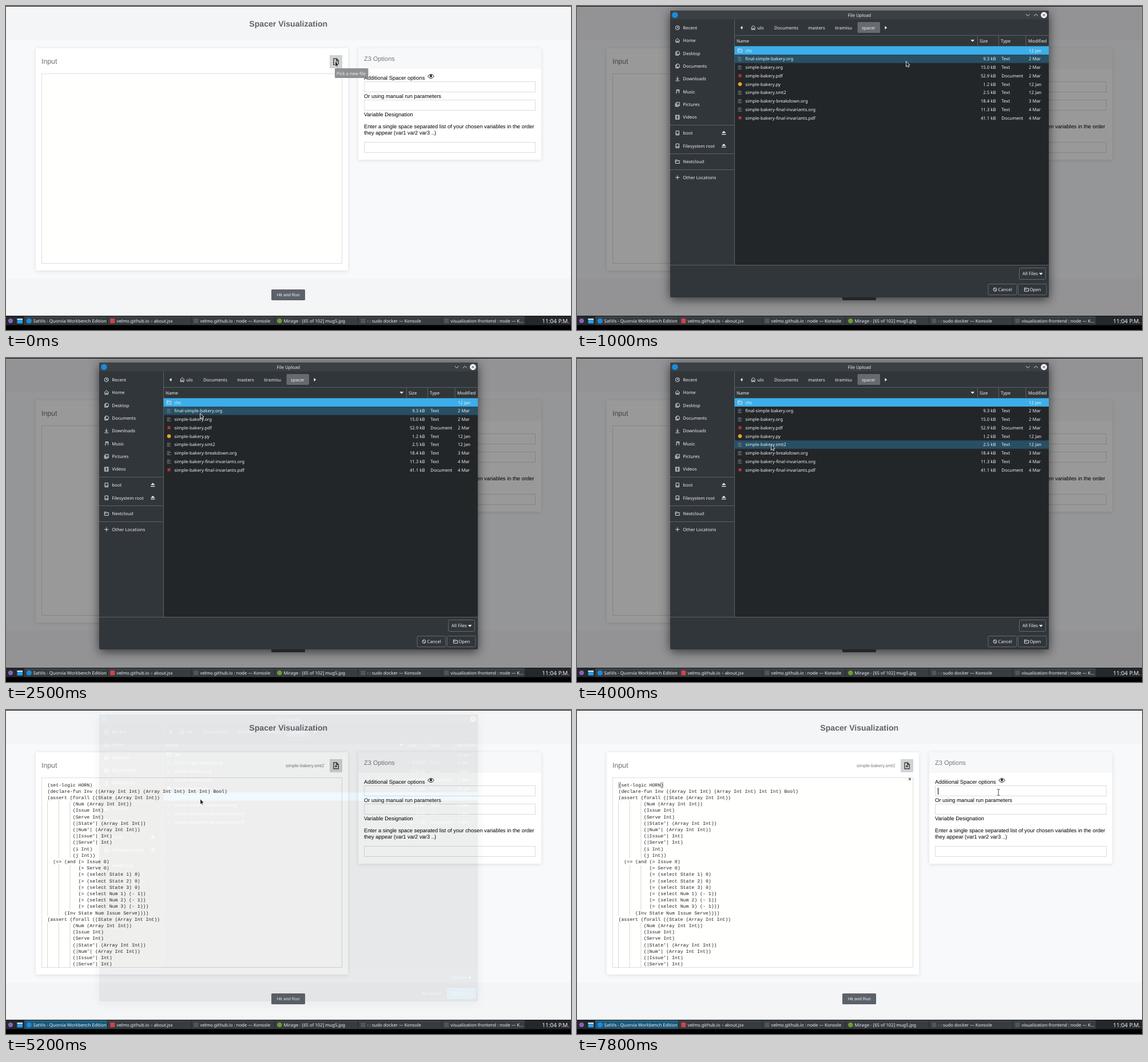
Animation, 988 px wide and 567 px high, one loop 8 s. Source, as an HTML page:

```html
<!DOCTYPE html>
<html lang="en">
<head>
<meta charset="utf-8">
<title>Spacer Visualization</title>
<style>
html, body { margin: 0; width: 100%; height: 100%; overflow: hidden; background: #000; }
svg { display: block; width: 100vw; height: 100vh; }
text { font-size: 7.75px; white-space: pre; text-rendering: geometricPrecision; }
.page text { font-family: "Liberation Sans", Arial, sans-serif; font-size: 9.4px; }
.page .code text { font-family: "Liberation Mono", "Courier New", monospace; font-size: 8.2px; fill: #222; }
.ui text { font-family: "Noto Sans", sans-serif; fill: #eff0f1; }
.icon { fill: none; stroke: #dfe1e2; stroke-width: 1; }
.anim { animation: 8s step-end infinite; }

#tip { animation-name: tip; }
#veil { animation-name: veil; }
#dialog { animation-name: dialog; }
#active { animation-name: active; }
#loaded { animation-name: loaded; }
#match { animation-name: match; }
#thumb { animation-name: thumb; }
#caret { animation-name: caret; }
#hover { animation-name: hover; }
#chosen { animation-name: chosen; }
#accept { animation-name: accept; }
#arrow { animation-name: arrow; }
#beam { animation-name: beam; }

@keyframes tip { 0% { opacity: 1 } 2.5% { opacity: .8 } 3.75% { opacity: .5 } 5% { opacity: .25 } 6.25%, 100% { opacity: 0 } }
@keyframes veil {
  0% { opacity: 0 } 10% { opacity: .15 } 11.25% { opacity: .3 } 12.5% { opacity: .4 }
  63.75% { opacity: .2 } 65%, 100% { opacity: 0 }
}
@keyframes dialog {
  0% { opacity: 0 } 10% { opacity: .35 } 11.25% { opacity: .8 } 12.5% { opacity: 1 }
  63.75% { opacity: .5 } 65% { opacity: .08 } 67.5%, 100% { opacity: 0 }
}
@keyframes active { 0% { opacity: 0 } 2.5% { opacity: 1 } 10% { opacity: 0 } 63.75%, 100% { opacity: 1 } }
@keyframes loaded { 0% { opacity: 0 } 63.75%, 100% { opacity: 1 } }
@keyframes match { 0% { opacity: 0 } 67.5%, 100% { opacity: 1 } }
@keyframes thumb {
  0% { opacity: 0 } 71.25% { opacity: 1 }
  78.75% { opacity: 1; animation-timing-function: steps(8) } 88.75%, 100% { opacity: 0 }
}
@keyframes caret { 0% { opacity: 0 } 88.75%, 100% { opacity: 1 } }
@keyframes accept { 0% { opacity: 0 } 61.25%, 100% { opacity: 1 } }
@keyframes chosen { 0% { transform: none } 57.5%, 100% { transform: translateY(73.75px) } }
@keyframes hover {
  0% { transform: translateY(14.75px) } 17.5% { transform: translateY(29.5px) }
  21.25% { transform: translateY(44.25px) } 22.5% { transform: translateY(29.5px) }
  23.75% { transform: translateY(14.75px) } 35% { transform: translateY(29.5px) }
  36.25% { transform: translateY(44.25px) } 46.25% { transform: translateY(59px) }
  50%, 100% { transform: translateY(73.75px) }
}
@keyframes arrow {
  0% { transform: translate(575px, 96px); opacity: 1 }
  13.75% { transform: translate(575px, 96px); animation-timing-function: steps(5) }
  20% { transform: translate(420px, 111px) }
  21.25% { transform: translate(375px, 115px) }
  22.5% { transform: translate(345px, 104px) }
  23.75% { transform: translate(340px, 98px) }
  31.25% { transform: translate(339px, 96px) }
  35% { transform: translate(338px, 109px) }
  36.25% { transform: translate(337px, 117px) }
  42.5% { transform: translate(336px, 122px) }
  43.75% { transform: translate(335px, 127px) }
  46.25% { transform: translate(336px, 135px) }
  50% { transform: translate(339px, 151px) }
  51.25% { transform: translate(339px, 153px) }
  52.5% { transform: translate(339px, 155px); opacity: 1 }
  67.5% { opacity: 0 }
  80% { transform: translate(605px, 188px); opacity: 1 }
  81.25% { transform: translate(790px, 190px) }
  82.5% { transform: translate(755px, 160px); opacity: 1 }
  83.75%, 100% { opacity: 0 }
}
@keyframes beam {
  0% { transform: translate(339px, 156px); opacity: 0 }
  67.5% { transform: translate(339px, 156px); opacity: 1 }
  73.75% { transform: translate(338px, 157px) }
  76.25% { transform: translate(337px, 158px) }
  77.5% { transform: translate(362px, 167px) }
  78.75% { transform: translate(470px, 184px); opacity: 1 }
  80% { opacity: 0 }
  83.75% { transform: translate(720px, 139px); opacity: 1 }
  86.25% { transform: translate(721px, 139px) }
  93.75% { transform: translate(726px, 134px) }
  95% { transform: translate(732px, 138px) }
  96.25% { transform: translate(736px, 142px) }
  97.5%, 100% { transform: translate(737px, 144px); opacity: 1 }
}
</style>
</head>
<body>
<svg viewBox="0 0 988 567" preserveAspectRatio="none"></svg>
<script>
const rect = (x, y, w, h, fill, more = '') => `<rect x="${x}" y="${y}" width="${w}" height="${h}" fill="${fill}" ${more}/>`;
const text = (x, y, s, more = '') => `<text x="${x}" y="${y}" ${more}>${s}</text>`;
const dot = (x, y, r, fill) => `<circle cx="${x}" cy="${y}" r="${r}" fill="${fill}"/>`;
const icon = (x, y, d, more = '') => `<path class="icon" transform="translate(${x} ${y})" d="${d}" ${more}/>`;
const box = (x, y, w, h, fill, stroke, r = 0) => rect(x + .5, y + .5, w - 1, h - 1, fill, `stroke="${stroke}" rx="${r}"`);
const each = (list, draw) => list.map(draw).join('');
const middle = 'text-anchor="middle"';
const shadow = (dy, blur, color) => `style="filter:drop-shadow(0 ${dy}px ${blur}px ${color})"`;

// Code listing: leading number is the indent in characters.
const locals = ['9(Num (Array Int Int))', '9(Issue Int)', '9(Serve Int)', "9(|State'| (Array Int Int))",
  "9(|Num'| (Array Int Int))", "9(|Issue'| Int)", "9(|Serve'| Int)"];
const clause = '0(assert (forall ((State (Array Int Int))';
const code = ['0(set-logic HORN)', '0(declare-fun Inv ((Array Int Int) (Array Int Int) Int Int) Bool)',
  clause, ...locals, '9(i Int)', '9(j Int))', '2(=&gt; (and (= Issue 0)', '11(= Serve 0)',
  ...[1, 2, 3].map(n => `11(= (select State ${n}) 0)`),
  ...[1, 2, 3].map(n => `11(= (select Num ${n}) (- 1))${n > 2 ? ')' : ''}`),
  '6(Inv State Num Issue Serve))))', clause, ...locals];

const codeLine = (line, i) => {
  const [, indent, body] = line.match(/^(\d\d?)(.*)$/);
  const top = 125.2 + i * 11.2;
  let guides = '';
  for (let c = 0; c < indent; c += 4) guides += rect(72 + c * 4.92, top, 1, Math.min(11.2, 450 - top), '#d6d6d6');
  return guides + text(72.5 + indent * 4.92, top + 8.3, body);
};

const field = y => box(626, y, 300, 19, '#fff', '#dcdcdc');

const page = `<g class="page">
  ${rect(0, 0, 988, 543, '#f8f9fb')}${rect(0, 0, 988, 60, '#f4f5f7')}${rect(0, 477, 988, 66, '#f4f5f7')}${rect(0, 0, 988, 1, '#111')}
  ${text(493.7, 36, 'Spacer Visualization', middle + ' style="font-size:14.1px;font-weight:bold" fill="#5f6368"')}
  ${rect(52, 74, 546, 389, '#fff', shadow(1, 3, '#0000001c'))}
  ${text(62, 100.5, 'Input', 'style="font-size:12.3px" fill="#6f6f6f"')}
  ${box(62, 118, 526, 333, '#fffffe', '#dededa')}
  ${rect(566, 86, 22, 23, '#d0d3d4', 'rx="1"')}
  ${icon(577, 97.5, 'M-4-5.3h5.2L4.3-2V5.3H-4ZM1-5v3.2h3M0-1.2v4.4M-2.2 1h4.4', 'style="stroke:#222;stroke-width:1.2"')}
  ${rect(616, 74, 320, 195, '#fff', shadow(1, 3, '#0000001c'))}${rect(616, 74, 320, 36, '#f7f8f9')}
  ${text(626, 95.5, 'Z3 Options', 'style="font-size:11px" fill="#777"')}
  ${text(626, 128.7, 'Additional Spacer options')}
  ${icon(743, 123, 'M-5.5 0Q0-7 5.5 0Q0 7-5.5 0Z', 'style="stroke:#111"')}${dot(743, 122.6, 2, '#111')}
  ${text(626, 161, 'Or using manual run parameters')}
  ${text(626, 193.3, 'Variable Designation')}
  ${text(626, 214, 'Enter a single space separated list of your chosen variables in the order')}
  ${text(626, 225.2, 'they appear (var1 var2 var3 ..)')}
  ${field(132)}${field(164)}${field(238)}
  ${rect(464, 496, 59, 19, '#5c6269', 'rx="1.5"')}
  ${text(493.7, 507.7, 'Hit and Run', middle + ' style="font-size:7.6px" fill="#f1f2f3"')}
  <g id="loaded" class="anim">
    ${text(489, 99.8, 'simple-bakery.smt2', 'style="font-size:7.85px" fill="#777"')}
    <g class="code">
      <g id="match" class="anim">
        ${box(72, 126, 5, 11, '#e6ebe3', '#b9bdb6')}${box(146, 126, 5, 11, '#e6ebe3', '#b9bdb6')}
        ${rect(580, 119, 4, 4, '#8a8a8a')}
      </g>
      ${each(code, codeLine)}
    </g>
  </g>
  ${rect(579, 118, 9, 128.5, '#c0c0c0', 'id="thumb" class="anim"')}
  ${rect(631, 136, 1, 12, '#000', 'id="caret" class="anim"')}
</g>
<g id="tip" class="anim ui">${rect(575, 109, 58.5, 17, '#8b8c8d', 'rx="1.5" opacity=".95"')}${text(578, 120.9, 'Pick a new file')}</g>`;

// Icon outlines, centred on 0,0.
const shape = {
  clock: 'M3.5 0A3.5 3.5 0 1 1 0-3.5A3.5 3.5 0 0 1 3.5 0M0-2.2V.3H2',
  home: 'M-4 .3L0-3.6L4 .3M-2.8 0V3.5H-.8V1H.8V3.5H2.8V0',
  folder: 'M-3.5 3V-3H-.5L.5-2H3.5V3ZM-3.5-.7H0L1-1.8',
  sheets: 'M-1.5-3.5H2L3.5-2V2H-1.5ZM-1.5-2H-3V3.5H2V2',
  down: 'M0-3.8V1.5M-2.5-.8L0 1.7L2.5-.8M-3.5 3.4H3.5',
  note: 'M-1.5 2.3V-3.2H3V1.6M-1.5-1.6H3M-3 2.5H-1.5M1.4 2H3',
  photo: 'M-2.2-3.5H3.5V2.2H-2.2ZM-3.6-2V3.6H2M-2 1L0-1L3 2',
  film: 'M-3.3-3.5H3.3V3.5H-3.3ZM-1.6-3.5V3.5M1.6-3.5V3.5',
  disk: 'M-2.7-3.5H2.7V3.5H-2.7ZM-2.7 1.5H2.7',
  plus: 'M-3.6 0H3.6M0-3.6V3.6',
  lines: 'M-3.5-2.7H2M-3.5-.7H3.5M-3.5 1.3H1M-3.5 3.2H3.5',
  ban: 'M3 0A3 3 0 1 1 0-3A3 3 0 0 1 3 0M-2-2L2 2',
};

const places = [['Recent', 38, 'clock'], ['Home', 60.3, 'home'], ['Desktop', 82.7, 'sheets'], ['Documents', 105.1, 'sheets'],
  ['Downloads', 127.5, 'down'], ['Music', 149.8, 'note'], ['Pictures', 172.2, 'photo'], ['Videos', 194.6, 'film'],
  ['boot', 222.3, 'disk'], ['Filesystem root', 244.7, 'disk'], ['Nextcloud', 272.4, 'folder'], ['Other Locations', 300, 'plus']];
const place = ([name, y, kind]) => icon(175.7, y, shape[kind]) + text(185.3, y + 2.8, name) +
  (kind === 'disk' ? `<path d="M253 ${y}l3.7-3.8l3.7 3.8zm0 1.6h7.4v1.3h-7.4z" fill="#eff0f1"/>` : '');

const files = ['chc|||12 Jan', 'final-simple-bakery.org|9.3 kB|Text|2 Mar', 'simple-bakery.org|15.0 kB|Text|2 Mar',
  'simple-bakery.pdf|52.9 kB|Document|2 Mar', 'simple-bakery.py|1.2 kB|Text|12 Jan', 'simple-bakery.smt2|2.5 kB|Text|12 Jan',
  'simple-bakery-breakdown.org|18.4 kB|Text|3 Mar', 'simple-bakery-final-invariants.org|11.3 kB|Text|4 Mar',
  'simple-bakery-final-invariants.pdf|41.1 kB|Document|4 Mar'];
const fileRow = (row, i) => {
  const [name, size, type, date] = row.split('|');
  const y = 77.7 + i * 14.75;
  const mark = !i ? icon(285, y, shape.folder)
    : name.endsWith('pdf') ? rect(282.5, y - 2.5, 5, 5, '#b8323c')
    : name.endsWith('py') ? dot(285, y, 3.3, '#f0a030')
    : icon(285, y, shape.lines, 'style="stroke:#777c80"');
  return mark + text(294.3, y + 2.8, name) + text(732.5, y + 2.8, size, 'text-anchor="end"') +
    text(742.3, y + 2.8, type) + text(790, y + 2.8, date);
};

const crumbs = [[321, 'ulo'], [366, 'Documents'], [419, 'masters'], [466, 'tiramisu'], [510, 'spacer']];
const edge = '#5c6165';
const button = (x, y, w, h) => box(x, y, w, h, '#31363b', '#64696d', 2);

const dialog = `<g id="dialog" class="anim ui">
  ${rect(163, 8, 662, 502, '#31363b', 'rx="2" ' + shadow(4, 9, '#000000a0'))}
  ${rect(163, 8, 662, 15.5, '#3a4045', 'rx="2"')}
  ${dot(171.3, 15.8, 5.3, '#1d8ad8')}${text(493.8, 18.7, 'File Upload', middle)}
  ${icon(788.3, 15.8, 'M-3.5-1.7L0 1.7L3.5-1.7')}${icon(802.4, 15.8, 'M-3.5 1.7L0-1.7L3.5 1.7')}
  ${dot(816.5, 15.8, 5.4, '#f3f4f4')}${icon(816.5, 15.8, 'M-2.2-2.2L2.2 2.2M2.2-2.2L-2.2 2.2', 'style="stroke:#31363b"')}
  ${each(places, place)}
  ${each([208, 258, 286], y => rect(163, y, 112, 1, edge))}
  ${rect(490.5, 28, 39.5, 19, '#676b6f', 'rx="2"')}
  ${icon(308.2, 38, shape.home)}${each(crumbs, ([x, s]) => text(x, 40.8, s, middle))}
  <path d="M289.3 35v6l-3.6-3zM538.5 35v6l3.6-3z" fill="#fff"/>
  ${rect(275, 51, 550, 403, '#232629')}${rect(275, 51, 550, 19.3, '#31363b')}
  ${each([[279, 'Name'], [704, 'Size'], [741, 'Type'], [789, 'Modified']], ([x, s]) => text(x, 63.6, s))}
  <path d="M688.5 59h6.4l-3.2 3.8z" fill="#fff"/>
  ${each([700, 737, 784.5], x => rect(x, 52, 1, 18, edge))}
  ${rect(275, 51, 550, 1, edge)}${rect(275, 23.5, 1, 430, edge)}${rect(163, 453, 662, 1, edge)}
  ${rect(275.5, 70.3, 549.5, 14.75, '#284f64', 'id="hover" class="anim"')}
  ${rect(275.5, 70.3, 549.5, 14.75, '#3daee9', 'id="chosen" class="anim"')}
  ${each(files, fileRow)}
  ${button(773, 458, 47, 21)}${text(779, 471.4, 'All Files')}<path d="M808 467h6.4l-3.2 3.8z" fill="#fff"/>
  ${button(718.5, 486, 51, 20)}${icon(731, 496.2, shape.ban)}${text(736.5, 499, 'Cancel')}
  ${button(771, 486, 50.5, 20)}${rect(771, 486, 50.5, 20, '#3daee9', 'id="accept" class="anim" rx="2"')}
  ${icon(786, 496.2, shape.folder)}${text(791.3, 499, 'Open')}
</g>`;

const tasks = ['SatVis - Quorvia Workbench Edition', 'velmo.github.io – about.jsx', 'velmo.github.io : node — Konsole',
  'Mirage - [65 of 102] mug5.jpg', '- : sudo docker — Konsole', 'visualization-frontend : node — K...'];
const taskX = i => 32 + i * 146;
const shell = x => rect(x - 4, 547, 8, 8, '#50565b');
const marks = [x => dot(x, 551, 4.6, '#1d8ad8'), x => rect(x - 4, 547, 8, 8, '#d2434a'), shell,
  x => dot(x, 551, 4.3, '#6f9a35'), shell, shell];
const slot = (i, fill, line, more = '') => rect(taskX(i), 543.5, 145, 14.5, fill, more) + rect(taskX(i), 543.5, 145, 1, line, more);

const taskbar = `<g class="ui">
  ${rect(0, 542, 988, 25, '#000')}${rect(0, 542.5, 988, 16, '#24282c')}
  ${dot(8, 551, 4.3, '#8a5fb8')}${rect(19.5, 547, 9.5, 8.5, '#2f9be6')}${rect(19.5, 547, 9.5, 2, '#d9ecf8')}
  ${each(tasks, (s, i) => slot(i, '#373c41', '#50555a'))}
  <g id="active" class="anim">${slot(0, '#1d5877', '#2f7ca5')}</g>
  ${each(tasks, (s, i) => marks[i](taskX(i) + 8.3) + text(taskX(i) + 15.5, 554, s))}
  ${text(985, 554.8, '11:04 P.M.', 'text-anchor="end" style="font-size:10.1px"')}
</g>`;

const cursors = `
  <path id="arrow" class="anim" d="M.5.5V10.3L2.7 8.5L4.3 11.3L5.8 10.5L4.4 7.8L7 7.2Z" fill="#24282b" stroke="#f2f2f2" stroke-width=".9"/>
  <path id="beam" class="anim" d="M-2.5-5.2H-.8L0-4.6L.8-5.2H2.5M0-4.6V4.6M-2.5 5.2H-.8L0 4.6L.8 5.2H2.5" fill="none" stroke="#333" stroke-width=".9"/>`;

document.querySelector('svg').innerHTML = page +
  rect(0, 0, 988, 543, '#000', 'id="veil" class="anim"') + dialog + taskbar + cursors;
</script>
</body>
</html>
```
